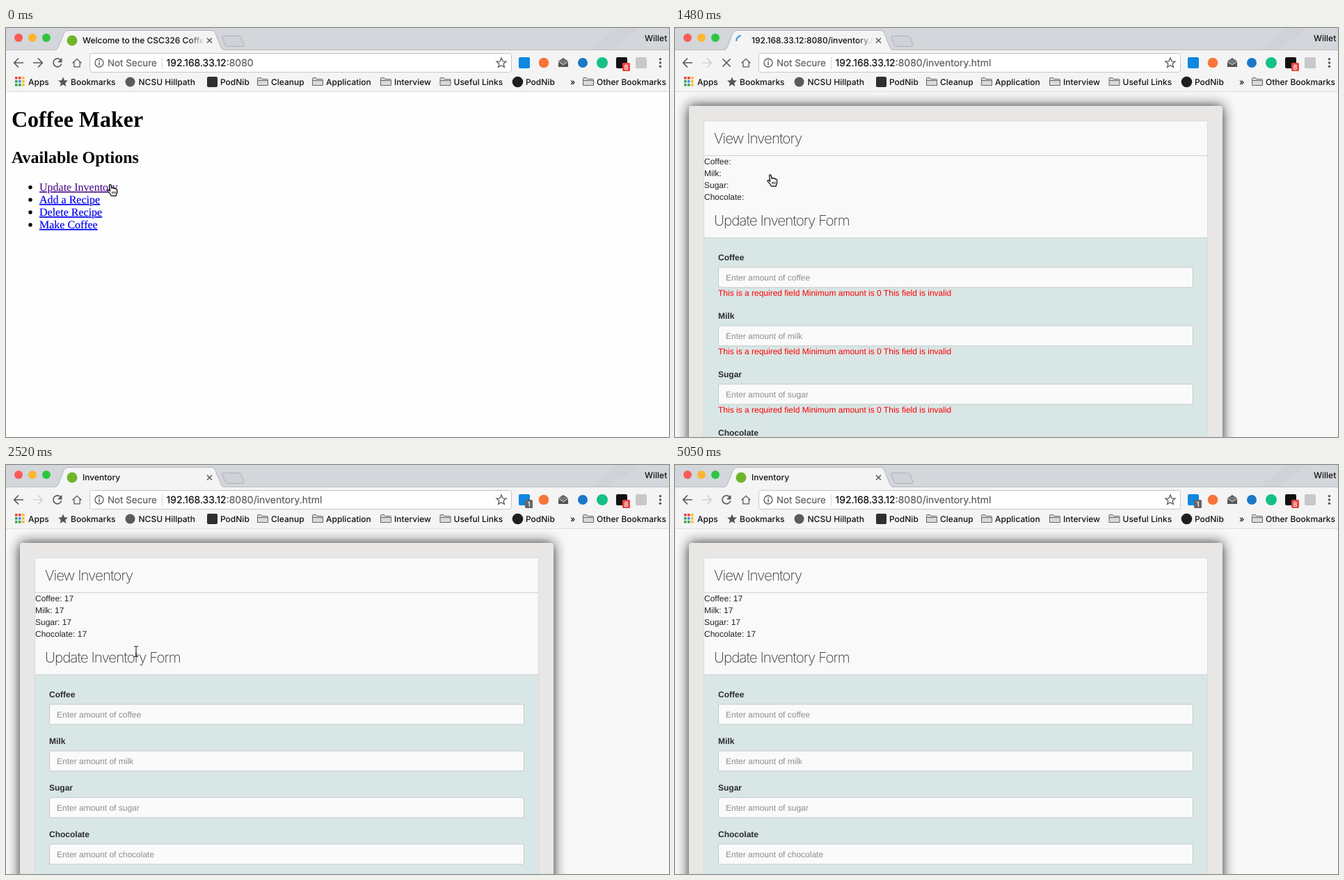
Animation of 953x588 px, one loop 6.7 s. Source, as an HTML page:

```html
<!DOCTYPE html>
<html lang="en">
<head>
<meta charset="utf-8">
<title>Inventory</title>
<style>
  html, body { margin: 0; width: 100%; height: 100%; overflow: hidden; background: #fff; }
  svg { display: block; width: 953px; height: 588px; text-rendering: geometricPrecision; }
  .ui { font: 500 12px Inter, Roboto, sans-serif; fill: #111; }
  .url { font: 400 13.4px Inter, Roboto, sans-serif; fill: #111; stroke: #111; stroke-width: .2; }
  .host { font-size: 14px; }
  .soft { fill: #5f5f5f; stroke: #5f5f5f; }
  .count { font-size: 10px; fill: #fff; text-anchor: middle; }
  .home { font: 16px "Liberation Serif", "Times New Roman", serif; }
  .home .h1 { font-size: 32px; font-weight: bold; }
  .home .h2 { font-size: 24px; font-weight: bold; }
  .link { fill: #00e; stroke: #00e; stroke-width: .15; text-decoration: underline 1px; text-underline-offset: 1px; }
  .seen { fill: #551a8b; stroke: #551a8b; }
  .form { font: 12px "Liberation Sans", Arial, sans-serif; fill: #222; }
  .form .head { font: 200 20.6px Inter, Lato, sans-serif; letter-spacing: -1px; fill: #333; }
  .form .label { font-weight: bold; fill: #2b2b2b; }
  .form .hint { fill: #8b8f8f; }
  .form .error { fill: #f00; }
  .line { fill: none; stroke: #5a5a5a; stroke-width: 1.7; }
  .thin { stroke-width: 1.3; }
</style>
</head>
<body>
<svg viewBox="0 0 953 588">
  <defs>
    <filter id="blur" x="-10%" y="-10%" width="120%" height="120%"><feGaussianBlur stdDeviation="9"/></filter>
    <linearGradient id="fade"><stop stop-color="#f4f4f4" stop-opacity="0"/><stop offset="1" stop-color="#f4f4f4"/></linearGradient>
    <clipPath id="view"><rect y="92" width="953" height="496"/></clipPath>
    <clipPath id="tabClip"><rect x="106" width="179" height="31"/></clipPath>
    <g id="folder" fill="#d9d9d9" stroke="#666">
      <path d="M.5 11.5V1.5Q.5.5 1.5.5H5.5L7 2.5H14.5Q15.5 2.5 15.5 3.5V11.5Z"/><path d="M.5 4.5H15.5"/>
    </g>
    <path id="star" d="M0-7 2-2.2 7-1.9 3.1 1.4 4.4 6.4 0 3.7-4.4 6.4-3.1 1.4-7-1.9-2-2.2Z"/>
  </defs>

  <g id="home" class="home">
    <rect y="92" width="953" height="496" fill="#fefefe"/>
    <text class="h1" x="8" y="142">Coffee Maker</text>
    <text class="h2" x="8" y="194">Available Options</text>
  </g>

  <g id="inventory" class="form" clip-path="url(#view)">
    <rect y="92" width="953" height="496" fill="#f8f8f8"/>
    <rect x="20" y="112" width="767" height="560" rx="4" filter="url(#blur)"/>
    <rect x="20" y="112" width="767" height="560" rx="3" fill="#e8e7e5"/>
    <rect x="41.5" y="133.5" width="724" height="500" rx="2" fill="#f9f9f9" stroke="#d9dada"/>
    <path d="M42 183.5H765" stroke="#d0d1d1"/>
    <rect x="42" y="301" width="723" height="300" fill="#d9e6e6"/>
    <path d="M42 301.5H765" stroke="#cbd3d3"/>
    <text class="head" x="56" y="166">View Inventory</text>
    <text class="head" x="56" y="284">Update Inventory Form</text>
  </g>

  <g id="browser">
    <rect width="953" height="32" fill="#d3d6da"/>
    <path d="M842 31 878 0H908L893 13 866 31Z" fill="#c9ccd1" opacity=".45"/>
    <rect y="31" width="953" height="61" fill="#f4f4f4"/>
    <path d="M0 31.5H953" stroke="#b9bbbf"/>
    <path d="M0 91.5H953" stroke="#dedede"/>
    <path d="M70 32Q74 31 75.5 27L83 8Q85 3.5 89 3.5H296Q299.5 3.5 301 8L308.5 27Q310 31 314 32" fill="#f4f4f4" stroke="#b4b7bb"/>
    <path d="M312 11.5H334Q337 11.5 338 14L342 24Q343 26.5 340 26.5H319Q316 26.5 315 24L311 14Q310 11.5 312 11.5Z" fill="#cfd2d7" stroke="#aeb1b6"/>
    <circle cx="18" cy="14" r="6" fill="#fc5b57"/>
    <circle cx="38" cy="14" r="6" fill="#fdb62f"/>
    <circle cx="58" cy="14" r="6" fill="#2dc640"/>
    <circle id="favicon" cx="95" cy="18" r="7.5" fill="#6fb52c"/>
    <path id="spinner" d="M-4.6-5A6.8 6.8 0 0 0-4.6 5" fill="none" stroke="#4a8fdc" stroke-width="2.2"/>
    <g clip-path="url(#tabClip)"><text id="title" class="ui" x="110" y="22"></text></g>
    <rect id="titleFade" x="262" y="8" width="23" height="20" fill="url(#fade)"/>
    <path d="M289 14.5 296 21.5M296 14.5 289 21.5" stroke="#555" stroke-width="1.4"/>
    <text class="ui" x="918" y="19">Willet</text>

    <path class="line" d="M25 50H12M18 43.5 11.7 50 18 56.5"/>
    <path id="forward" class="line" d="M39 50H52M46 43.5 52.3 50 46 56.5"/>
    <g id="reload"><path class="line" d="M78.7 46A6 6 0 1 0 79.8 51.5"/><path d="M80.5 43V49.5H74Z" fill="#5a5a5a"/></g>
    <path id="stop" class="line" d="M68.5 44.5 79.5 55.5M79.5 44.5 68.5 55.5"/>
    <path class="line thin" d="M95.5 50.5 102 44.3 108.5 50.5M97.8 49V55.8H106.2V49"/>
    <rect x="120.5" y="36.5" width="606" height="27" rx="3" fill="#fff" stroke="#c6c6c6"/>
    <circle class="line thin" cx="134" cy="50" r="6"/>
    <path d="M134 46.2V47.8M134 49V53.6" stroke="#5a5a5a" stroke-width="1.6"/>
    <text class="url soft" x="146" y="55">Not Secure</text>
    <path d="M224.5 42V59" stroke="#d5d5d5"/>
    <text class="url host" x="230.5" y="55">192.168.33.12<tspan id="path" class="soft"></tspan></text>
    <use href="#star" x="712" y="50" class="line thin"/>

    <rect x="737" y="42" width="16" height="16" rx="2" fill="#0d87e0"/>
    <g id="badge"><rect x="746" y="50" width="11" height="12" rx="1.5" fill="#666"/><text class="ui count" x="751.5" y="59.7">1</text></g>
    <circle cx="773" cy="50" r="7.3" fill="#f8743a"/>
    <path d="M794 48 801 43 808 48V56H794Z" fill="#555"/>
    <path d="M796 48V45.5H806V48L801 51.5Z" fill="#777"/><path d="M794.5 48.5 801 52.7 807.5 48.5" fill="none" stroke="#f4f4f4"/>
    <circle cx="829" cy="50" r="7" fill="#1c78c8"/>
    <circle cx="857" cy="50" r="8" fill="#15c088"/>
    <rect x="877" y="42" width="16" height="16" rx="2" fill="#111"/>
    <rect x="886" y="50" width="11" height="12" rx="1.5" fill="#e8443f"/>
    <text class="ui count" x="891.5" y="59.7">8</text>
    <rect x="905" y="42" width="16" height="16" rx="2" fill="#c8c8c8"/>
    <g fill="#555"><circle cx="940.5" cy="44.8" r="1.7"/><circle cx="940.5" cy="50" r="1.7"/><circle cx="940.5" cy="55.2" r="1.7"/></g>

    <use href="#star" x="82" y="77.5" fill="#555"/>
    <circle cx="178.5" cy="77.5" r="7" fill="#5b5b5b"/>
    <rect x="289" y="70" width="15" height="15" rx="2" fill="#2f2f2f"/>
    <circle cx="735.5" cy="77.5" r="7.8" fill="#1f1f1f"/>
  </g>

  <g id="cursor">
    <path id="arrow" d="M0 0V15L3.5 11.7 6 17.2 8.4 16.2 6 10.8H10.6Z" fill="#000" stroke="#fff"/>
    <g id="hand" stroke="#000" stroke-width="1.2" stroke-linejoin="round">
      <path fill="#fff" d="M4.6 10.6 3.6 2.2C3.4.6 5.6.4 6 2L7 6.5C7.2 5.2 9.3 5.2 9.5 6.7 10 5.8 11.8 6 12 7.3 12.8 6.7 14.6 7.2 14.6 8.6V12C14.6 14 13.2 15 13.2 17.4H6.3C5.5 14.5 3 13 1.2 10.5.4 9 2 8.2 3.1 9.2Z"/>
      <path d="M7.8 11V14.4M9.9 11V14.4M12 11V14.4" stroke-width=".9"/>
    </g>
    <path id="beam" d="M-3-7.5Q0-7.5 0-6V6Q0 7.5-3 7.5M3-7.5Q0-7.5 0-6V6Q0 7.5 3 7.5M-1.5 3H1.5" fill="none" stroke="#222" stroke-width="1.1"/>
  </g>
</svg>
<script>
const LOOP = 6700, FRAME = 148;
const LOAD = 450, OPEN = 1480, READY = 1630, VALUES = 2080, DONE = 2220, BADGE = 2370;
const NS = 'http://www.w3.org/2000/svg';
const $ = id => document.getElementById(id);

function add(parent, tag, attrs, text = '') {
  const el = document.createElementNS(NS, tag);
  for (const key in attrs) el.setAttribute(key, attrs[key]);
  el.textContent = text;
  return parent.appendChild(el);
}
const show = (el, on) => { el.style.display = on ? '' : 'none'; };

['Update Inventory', 'Add a Recipe', 'Delete Recipe', 'Make Coffee'].forEach((name, i) => {
  const y = 234 + i * 18;
  add($('home'), 'circle', { cx: 35, cy: y - 5, r: 2.7 });
  add($('home'), 'text', { x: 48, y, class: i ? 'link' : 'link seen' }, name);
});

const rows = ['Coffee', 'Milk', 'Sugar', 'Chocolate'].map((name, i) => {
  const stock = add($('inventory'), 'text', { x: 42, y: 196 + i * 17 });
  const group = add($('inventory'), 'g', {});
  add(group, 'text', { x: 62, y: 334, class: 'label' }, name);
  add(group, 'rect', { x: 62.5, y: 344, width: 682, height: 29, rx: 2, fill: '#fafafa', stroke: '#c3c9c9' });
  add(group, 'text', { x: 73, y: 362.5, class: 'hint' }, 'Enter amount of ' + name.toLowerCase());
  const error = add(group, 'text', { x: 62, y: 385, class: 'error' },
    'This is a required field Minimum amount is 0 This field is invalid');
  return { name, stock, group, error };
});

const bookmarks = [
  [32, 'Apps'], [93, 'Bookmarks'], [190.5, 'NCSU Hillpath'], [308, 'PodNib'], [381, 'Cleanup', 1],
  [460, 'Application', 1], [558, 'Interview', 1], [643.5, 'Useful Links', 1], [747, 'PodNib'],
  [811, '»'], [849, 'Other Bookmarks', 1]
];
for (const [x, name, folder] of bookmarks) {
  add($('browser'), 'text', { x, y: 82, class: 'ui' }, name);
  if (folder) add($('browser'), 'use', { href: '#folder', x: x - 20, y: 71 });
}
['#e8453c', '#e8453c', '#f9bb2d', '#3aa757', '#4688f1', '#f9bb2d', '#3aa757', '#3aa757', '#f9bb2d']
  .forEach((fill, i) => add($('browser'), 'rect',
    { x: 13 + i % 3 * 5, y: 70 + Math.floor(i / 3) * 5, width: 3.6, height: 3.6, fill }));

// time, shape, x, y
const moves = [
  [0, 'hand', 145, 224], [150, 'hand', 131, 232], [450, 'hand', 131, 230],
  [1480, 'hand', 132, 210], [1630, 'arrow', 136, 208], [2080, 'arrow', 143, 216],
  [2220, 'arrow', 165, 240], [2370, 'beam', 184, 264], [2520, 'beam', 187, 268],
  [2820, 'beam', 187, 275], [2970, 'arrow', 130, 222], [3120, 'beam', 73, 190],
  [3270, 'beam', 84, 204], [3420, 'beam', 100, 222], [3570, 'arrow', 138, 242],
  [3720, 'arrow', 155, 243], [3860, 'arrow', 160, 246], [4010, 'arrow', 171, 250],
  [4160, 'arrow', 303, 308], [4300, 'beam', 384, 357], [4450, 'beam', 560, 492],
  [4600, 'beam', 596, 543], [4750, 'beam', 597.5, 546], [5050, '', 0, 0]
];

function render(t) {
  const loading = t >= LOAD && t < DONE;
  const opened = t >= OPEN, ready = t >= READY;
  show($('home'), !opened);
  show($('inventory'), opened);
  show($('favicon'), !loading);
  show($('spinner'), loading);
  show($('reload'), !loading);
  show($('stop'), loading);
  show($('badge'), t >= BADGE);
  show($('titleFade'), !ready);
  $('forward').style.stroke = t >= LOAD ? '#d2d2d2' : '';
  $('title').textContent = ready ? 'Inventory'
    : t >= LOAD ? '192.168.33.12:8080/inventory.html' : 'Welcome to the CSC326 Coffee Maker';
  $('path').textContent = t >= LOAD ? ':8080/inventory.html' : ':8080';

  const turn = (Math.floor((t + 2) / FRAME) * FRAME - 1330) * 0.27;
  $('spinner').setAttribute('transform', `translate(95 18) rotate(${turn})`);

  rows.forEach(({ name, stock, group, error }, i) => {
    stock.textContent = name + (t >= VALUES ? ': 17' : ':');
    group.setAttribute('transform', `translate(0 ${i * (ready ? 67 : 84)})`);
    show(error, !ready);
  });

  const [, shape, x, y] = moves.findLast(move => move[0] <= t);
  for (const id of ['arrow', 'hand', 'beam']) show($(id), id === shape);
  $('cursor').setAttribute('transform', `translate(${x} ${y})`);
}

const start = performance.now();
function tick() {
  render((performance.now() - start) % LOOP);
  requestAnimationFrame(tick);
}
tick();
</script>
</body>
</html>
```
